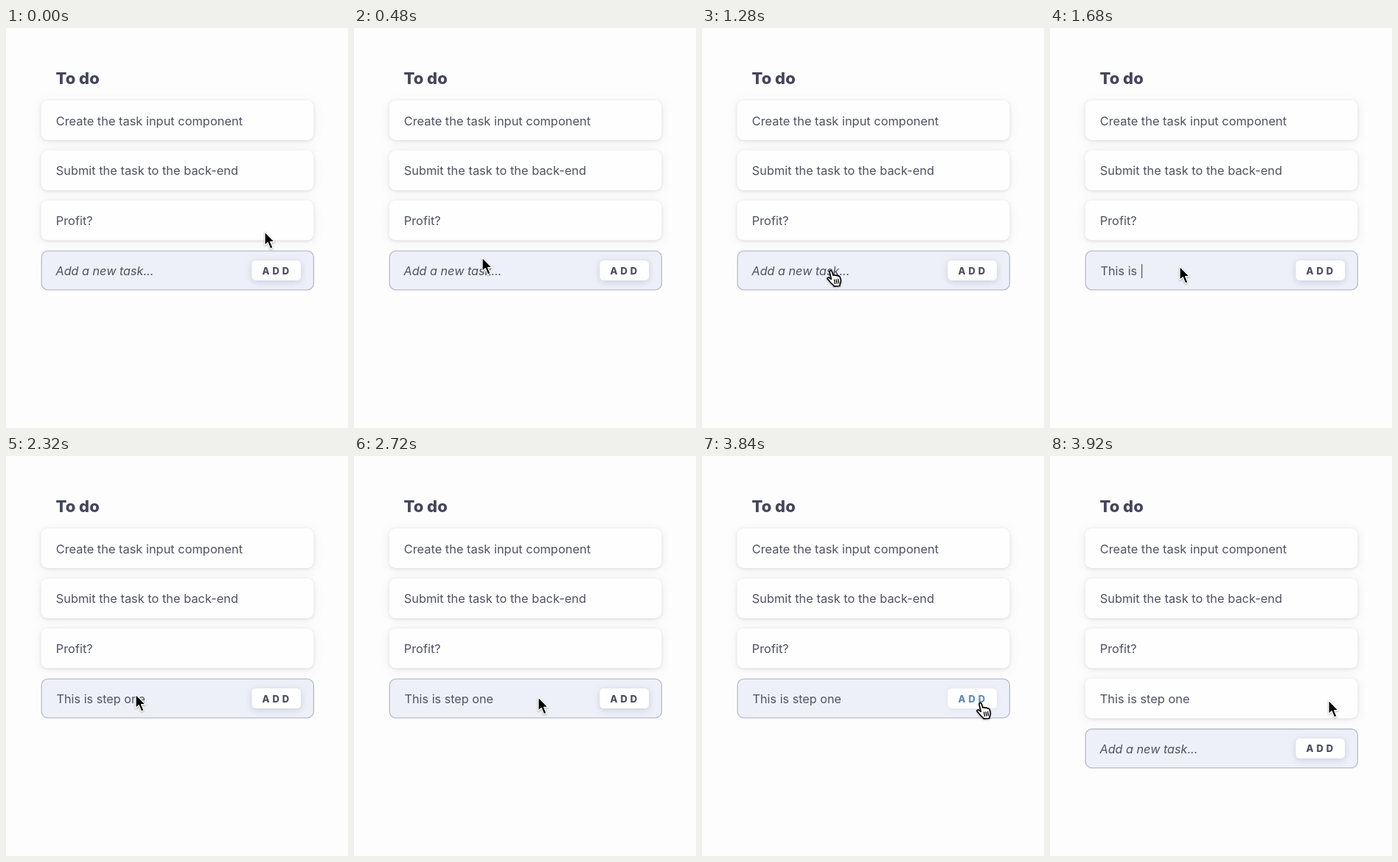
These frames come from a looping animation (464 by 542 pixels, 4560 ms). An HTML page:

```html
<!DOCTYPE html>
<html lang="en">
<head>
<meta charset="utf-8">
<title>To do</title>
<style>
  html, body { margin: 0; width: 100%; height: 100%; overflow: hidden; background: #fdfdfd; }
  svg { display: block; width: 100%; height: 100%; }
  text { font: 16.2px Inter, sans-serif; fill: #515263; white-space: pre; }
  .title { font-size: 22px; font-weight: 800; fill: #44465a; }
  .item { font-size: 16.4px; }
  .hint { font-style: italic; }
  .card { fill: #fefefe; filter: drop-shadow(0 1.5px 2px rgba(30, 30, 45, .12)) drop-shadow(0 2px 7px rgba(30, 30, 45, .06)); }
  .field { fill: #edf0f8; stroke: #b9bbc9; stroke-width: 1.3; }
  .button { fill: #fff; filter: drop-shadow(0 2px 5px rgba(60, 65, 110, .2)); }
  .label { font-size: 13px; font-weight: 800; letter-spacing: 3.9px; fill: #4a4c5e; }
  .pressed .label { fill: #5f8bb4; }
  .pressed .button { filter: drop-shadow(0 1px 3px rgba(60, 65, 110, .08)); }
  .pointer { filter: drop-shadow(0 1px 1px rgba(0, 0, 0, .3)); }
</style>
</head>
<body>
<svg viewBox="0 0 464 542">
  <text class="title" x="67.5" y="76">To do</text>
  <g id="cards"></g>
  <g id="form">
    <rect class="field" x="48.2" y="302.2" width="369.2" height="52.6" rx="8.5"/>
    <text class="hint" id="hint" x="67.5" y="335">Add a new task...</text>
    <text id="typed" x="68.6" y="335"></text>
    <rect id="caret" y="320" width="1.2" height="19" fill="#515263"/>
    <rect class="button" x="333.5" y="315" width="66.5" height="27" rx="5.5"/>
    <text class="label" x="347.5" y="333.5">ADD</text>
  </g>
  <g id="pointer" class="pointer" stroke-linejoin="round" stroke-linecap="round">
    <path id="arrow" fill="#000" stroke="#fff" stroke-width="1.3"
      d="M0 0V18.6L4.2 14.8L7.6 23L11 21.6L7.6 13.6H13.2Z"/>
    <g id="hand" transform="translate(-6 2.8) scale(.96)" fill="#fff" stroke="#000" stroke-width="1.7">
      <path d="M4.2 2.6Q4 .8 5.8 .8Q7.2 .8 7.7 2.4L9.3 7.6Q11.5 6.4 12.6 8Q14.6 7 15.8 8.6Q18 8 19 10.4L20 14Q20.6 17.5 19 20L18.6 22.6L10.4 23L9.6 21.4Q6 19 3.2 14.6Q.4 12.6 1.2 11.4Q2.4 10 4.6 11.6L6.6 13Z"/>
      <path d="M11 14l1 5.4M13.7 13.6l1 5.4M16.3 13.2l1 5.4" fill="none" stroke-width="1.4"/>
    </g>
  </g>
</svg>
<script>
const LOOP = 4560, TICK = 80, PITCH = 67.8;
const FOCUS = 1360, TYPE = 1600, TYPED = 1840, SUBMIT = 3920;
const TASK = 'This is step one', CHUNK = 4;
const $ = id => document.getElementById(id);
const show = (id, on) => $(id).setAttribute('visibility', on ? 'visible' : 'hidden');
const clamp = (v, lo, hi) => Math.min(hi, Math.max(lo, v));
const smooth = p => p * p * (3 - 2 * p);
const easeOut = p => p * (2 - p);

const items = ['Create the task input component', 'Submit the task to the back-end', 'Profit?', TASK];
$('cards').innerHTML = items.map((label, i) => `
  <g id="card${i}" transform="translate(0 ${i * PITCH})">
    <rect class="card" x="47.5" y="98" width="370" height="54" rx="9"/>
    <text class="item" x="67.7" y="131.6">${label}</text>
  </g>`).join('');

const home = { x: 351, y: 276 };
const moves = [
  { from: 0, to: 480, x: 174, y: 311, ease: smooth, lift: 36 },
  { from: 480, to: 800, x: 175, y: 325, ease: easeOut },
  { from: 1280, to: FOCUS, x: 176, y: 323, ease: smooth },
  { from: 2480, to: 3040, x: 364, y: 332.5, ease: smooth },
  { from: 3040, to: 3120, x: 378, y: 331, ease: smooth }
];

function pointerAt(t) {
  let { x, y } = home;
  for (const m of moves) {
    const p = m.ease(clamp((t - m.from) / (m.to - m.from), 0, 1));
    x += (m.x - x) * p;
    y += (m.y - y) * p - (m.lift || 0) * Math.sin(Math.PI * p);
  }
  return { x, y };
}

function render(time) {
  const t = Math.floor(time % LOOP / TICK) * TICK;
  const added = t >= SUBMIT;
  const editing = t >= FOCUS && !added;

  const { x, y } = pointerAt(t);
  const overButton = editing && x > 333;
  const overHint = t < FOCUS && y > 315;
  $('pointer').setAttribute('transform', `translate(${x} ${y})`);
  show('hand', overButton || overHint);
  show('arrow', !overButton && !overHint);

  const count = clamp(((t - TYPE) / TICK + 1) * CHUNK, 0, TASK.length);
  $('typed').textContent = editing ? TASK.slice(0, count) : '';
  $('caret').setAttribute('x', 70 + $('typed').getComputedTextLength());
  show('caret', editing && Math.max(0, t - TYPED) % 1040 < 480);
  show('hint', !editing);

  show('card3', added);
  $('form').setAttribute('transform', `translate(0 ${added ? PITCH : 0})`);
  $('form').setAttribute('class', t === SUBMIT - TICK ? 'pressed' : '');
}

let start;
function loop(now) {
  start ??= now;
  render(now - start);
  requestAnimationFrame(loop);
}
render(0);
requestAnimationFrame(loop);
</script>
</body>
</html>
```
